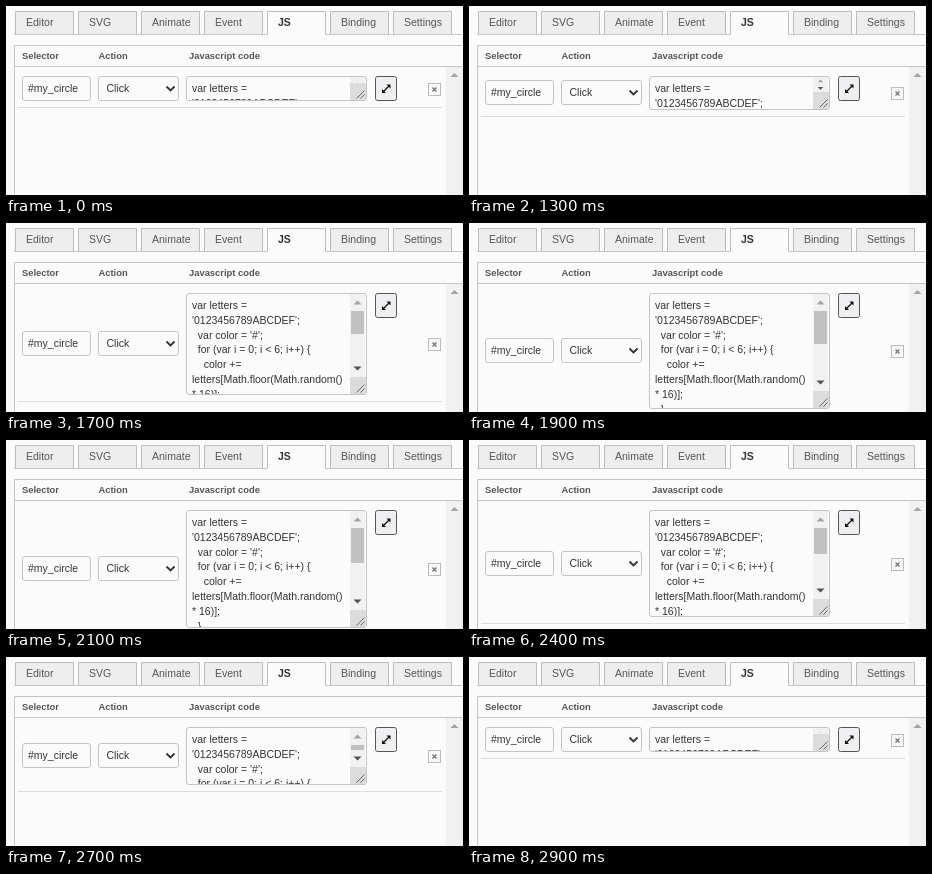
Recreate the animation shown at these times as an HTML page. Size 457 px wide and 189 px high, loop 3.9 s.

```html
<!DOCTYPE html>
<html lang="en">
<head>
<meta charset="utf-8">
<style>
  html, body { margin: 0; width: 100%; height: 100%; overflow: hidden; background: #fbfbfb; }
  svg { display: block; }
  text { font: 10.5px "Liberation Sans", Arial, sans-serif; fill: #333; white-space: pre; }
  .head text { font-size: 9.4px; font-weight: bold; fill: #555; }
  .tab { fill: #555; }
  .tab.on { fill: #333; font-weight: bold; }
  .box { fill: #fbfbfb; stroke: #c4c4c4; }
  .rule { fill: none; stroke: #c4c4c4; }
</style>
</head>
<body>
<svg id="stage" width="457" height="189">
  <g id="tabs"></g>
  <path class="rule" d="M8.5 189V39.5H457M9 60.5H457"/>
  <g class="head">
    <text x="16" y="53">Selector</text>
    <text x="92.5" y="53">Action</text>
    <text x="183" y="53">Javascript code</text>
  </g>
  <rect x="440" y="61" width="17" height="128" fill="#f1f1f1"/>
  <path d="M444.5 71l4-4 4 4z" fill="#a3a3a3"/>

  <g id="fields">
    <rect class="box" x="16.5" y="70.5" width="68" height="24" rx="2.5"/>
    <text x="22" y="86">#my_circle</text>
    <rect class="box" x="92.5" y="70.5" width="80" height="24" rx="2.5"/>
    <text x="100.5" y="86">Click</text>
    <path d="M160.5 80.5l4 4 4-4" fill="none" stroke="#333" stroke-width="1.8"/>
    <rect x="422.5" y="77.5" width="12" height="12" fill="#f8f8f8" stroke="#bbb"/>
    <path d="M426.5 81.5l4 4m0-4l-4 4" stroke="#777" stroke-width="1.4"/>
  </g>

  <rect class="box" id="area" x="180.5" y="70.5" width="180" rx="2.5"/>
  <svg id="code" x="181" y="71" width="163"></svg>
  <rect id="track" x="344" y="71" width="15" fill="#f1f1f1"/>
  <rect id="thumb" x="345" y="88" width="13" fill="#c1c1c1"/>
  <path id="up" fill="#a3a3a3"/>
  <path id="down" fill="#505050"/>
  <g id="corner">
    <rect x="344" y="-18" width="16" height="17" fill="#dcdcdc"/>
    <path d="M350.5 -2.5l8-8M354.5 -2.5l4-4" stroke="#666"/>
  </g>

  <rect x="369.5" y="70.5" width="21" height="24" rx="2" fill="#efeff2" stroke="#555"/>
  <path d="M377.5 85.5l5.5-5.5" stroke="#111" stroke-width="1.2"/>
  <path d="M380.5 78.5h4v4zM376 83v4h4z" fill="#111"/>
  <path id="line" d="M12 .5H436" stroke="#dcdcdc"/>
</svg>
<script>
const $ = id => document.getElementById(id);
const set = (id, attrs) => {
  for (const k in attrs) $(id).setAttribute(k, attrs[k]);
};

const names = ['Editor', 'SVG', 'Animate', 'Event', 'JS', 'Binding', 'Settings'];
$('tabs').innerHTML = names.map((name, i) => {
  const x = 9.5 + 63 * i, on = name === 'JS';
  return `<path d="M${x} 28.5V5.5h58v23" fill="${on ? '#fbfbfb' : '#eee'}" stroke="#bdbdbd"/>
    <text class="tab ${on ? 'on' : ''}" x="${x + 10.5}" y="20">${name}</text>`;
}).join('') + '<path class="rule" d="M8 28.5H261.5M319.5 28.5H457"/>';

const lines = ['var letters =', "'0123456789ABCDEF';", "  var color = '#';",
  '  for (var i = 0; i < 6; i++) {', '    color +=',
  'letters[Math.floor(Math.random()', '* 16)];', '  }'];
lines.forEach((s, i) => {
  const t = document.createElementNS('http://www.w3.org/2000/svg', 'text');
  t.setAttribute('x', 5);
  t.setAttribute('y', 15 + Math.round(14.8 * i));
  t.textContent = s;
  $('code').append(t);
});

// The drag is sampled every 100 ms: one height per step.
const LOW = 25, CONTENT = 222, STEP = 100;
const grow = [34, 53, 73, 90, 102, 112, 116, 117, 118];
const shrink = [107, 92, 75, 58, 40, LOW];

function heightAt(ms) {
  const pick = (list, start) => list[Math.min(list.length - 1, Math.floor((ms - start) / STEP))];
  return ms < 1300 ? LOW : ms < 2400 ? pick(grow, 1300) : pick(shrink, 2400);
}

function arrow(y, size, dir) {
  const r = Math.min(4, size / 2 - 1);
  return `M${351.5 - r} ${y - dir * r / 2}h${2 * r}l${-r} ${dir * r}z`;
}

function draw(now) {
  const h = heightAt(now % 3900), bottom = 70 + h;
  const bar = h - 19, button = Math.min(17, bar / 2), free = bar - 2 * button;
  const thumb = Math.min(free, Math.max(17, free * h / CONTENT));

  set('fields', { transform: `translate(0 ${Math.floor((h - LOW) / 2)})` });
  set('area', { height: h - 1 });
  set('code', { height: h - 2 });
  set('track', { height: bar });
  set('thumb', { height: Math.round(thumb) });
  set('up', { d: arrow(71 + button / 2, button, -1) });
  set('down', { d: arrow(71 + bar - button / 2, button, 1) });
  set('corner', { transform: `translate(0 ${bottom})` });
  set('line', { transform: `translate(0 ${bottom + 6})` });
}

const start = performance.now();
function tick() {
  draw(performance.now() - start);
  requestAnimationFrame(tick);
}
tick();
</script>
</body>
</html>
```
